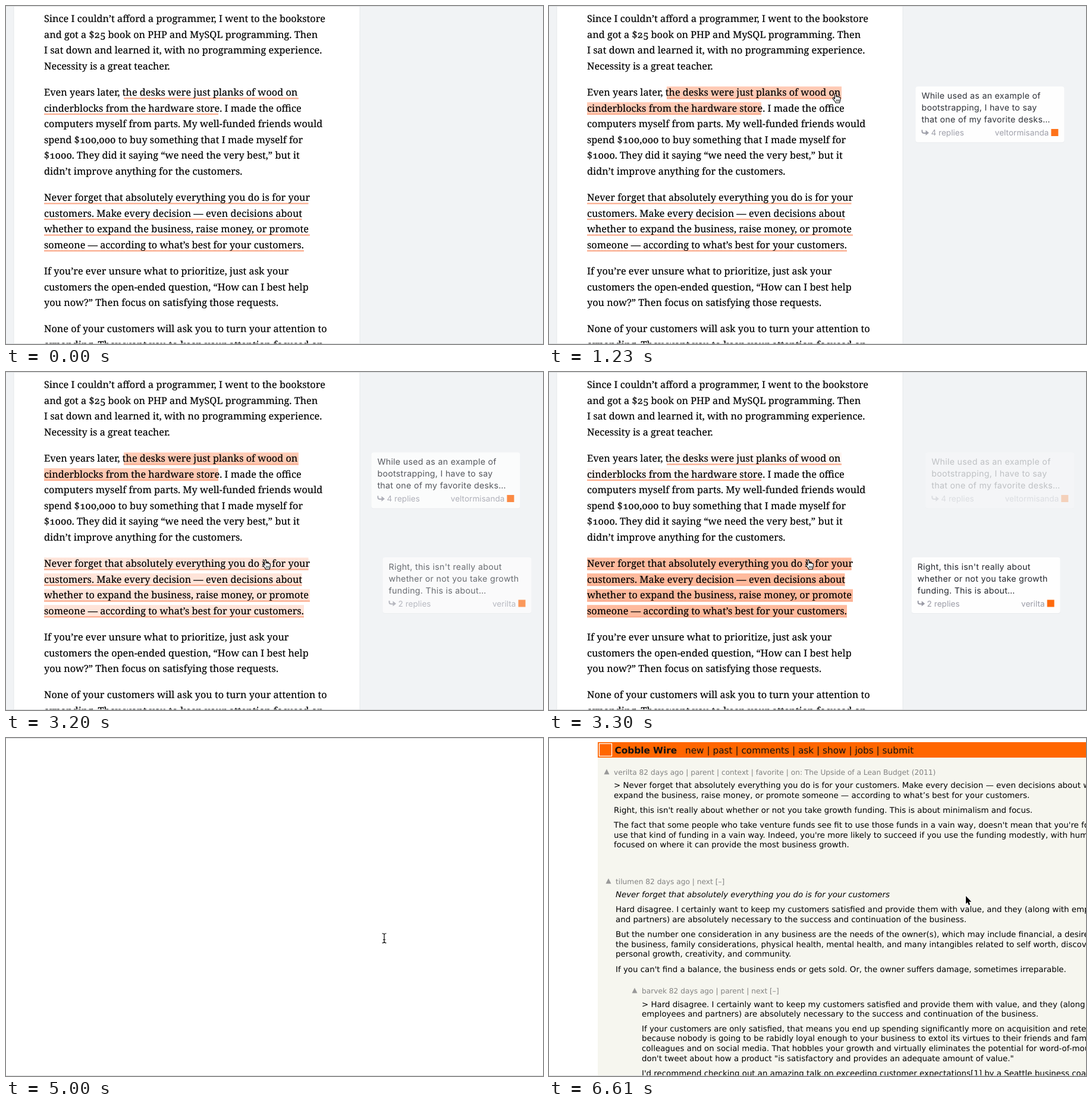
These frames come from a looping animation (903 by 569 pixels, 6650 ms). An HTML page:

```html
<!DOCTYPE html>
<html lang="en">
<head>
<meta charset="utf-8">
<title>Article notes</title>
<style>
html, body { margin: 0; width: 100%; height: 100%; overflow: hidden; background: #fff; }
svg { display: block; width: 903px; height: 569px; }
text { white-space: pre; text-rendering: geometricPrecision; }
.body { font: 16.3px "Noto Serif", serif; font-variant-numeric: oldstyle-nums; stroke: #000; stroke-width: .2px; }
.note { font: 14.2px Inter, sans-serif; letter-spacing: .3px; fill: #24272e; }
.foot { font: 13.5px Inter, sans-serif; letter-spacing: .05px; fill: #9a9ba6; }
.post { font: 13.36px "DejaVu Sans", sans-serif; }
.quote { font-style: italic; }
.meta { font: 12.2px "DejaVu Sans", sans-serif; fill: #828282; }
.nav { font: 15.3px "DejaVu Sans", sans-serif; fill: #111; }
.brand { font-weight: 700; }
</style>
</head>
<body>
<svg id="stage" viewBox="0 0 903 569"></svg>
<script>
const NS = "http://www.w3.org/2000/svg";
const stage = document.getElementById("stage");
const LOOP = 6650;

function el(parent, tag, attrs = {}, content) {
  const node = document.createElementNS(NS, tag);
  for (const k in attrs) node.setAttribute(k, attrs[k]);
  if (content !== undefined) node.textContent = content;
  parent.appendChild(node);
  return node;
}
const group = (parent, attrs) => el(parent, "g", attrs);
const rect = (parent, x, y, width, height, fill, more) =>
  el(parent, "rect", { x, y, width, height, fill, ...more });
const text = (parent, cls, x, y, str, more) =>
  el(parent, "text", { class: cls, x, y, ...more }, str);

// Article page
const LINE = 26.57;
const article = group(stage);
rect(article, 0, 0, 903, 569, "#f1f3f5");
rect(article, 12.5, 0, 583, 569, "#e6e8eb");
rect(article, 13.5, 0, 581, 569, "#fff");

function passage(spans) {
  const glow = group(article, { opacity: 0 });
  for (const [x, end, y] of spans) {
    rect(glow, x, y - 15.5, end - x, 20.5, "#ffb08f");
    rect(article, x, y + 3.4, end - x, 2.2, "#fbab8c");
  }
  return glow;
}
const glows = [
  passage([[198, 492, 151], [64, 357, 151 + LINE]]),
  passage([508.5, 497.5, 511, 501].map((end, i) => [64, end, 328 + i * LINE]))
];

const paragraphs = [
  [27, "Since I couldn’t afford a programmer, I went to the bookstore",
    "and got a $25 book on PHP and MySQL programming. Then",
    "I sat down and learned it, with no programming experience.",
    "Necessity is a great teacher."],
  [151, "Even years later, the desks were just planks of wood on",
    "cinderblocks from the hardware store. I made the office",
    "computers myself from parts. My well-funded friends would",
    "spend $100,000 to buy something that I made myself for",
    "$1000. They did it saying “we need the very best,” but it",
    "didn’t improve anything for the customers."],
  [328, "Never forget that absolutely everything you do is for your",
    "customers. Make every decision — even decisions about",
    "whether to expand the business, raise money, or promote",
    "someone — according to what’s best for your customers."],
  [452, "If you’re ever unsure what to prioritize, just ask your",
    "customers the open-ended question, “How can I best help",
    "you now?” Then focus on satisfying those requests."],
  [549, "None of your customers will ask you to turn your attention to",
    "expanding. They want you to keep your attention focused on"]
];
for (const [top, ...lines] of paragraphs)
  lines.forEach((line, i) => text(article, "body", 64, top + i * LINE, line));

function card(y, lines, replies, author) {
  const g = group(article);
  rect(g, 0, 1, 250, 94, "#e8eaed", { rx: 4 });
  rect(g, 0, 0, 250, 94, "#fff", { rx: 4 });
  lines.forEach((line, i) => text(g, "note", 10, 20.5 + i * 20, line));
  el(g, "path", { d: "M11 73v2.5q0 3 3 3h6", fill: "none", stroke: "#9a9ba6", "stroke-width": 2 });
  el(g, "path", { d: "M17 73.5v9l5.5-4.5z", fill: "#9a9ba6" });
  text(g, "foot", 26, 82.5, replies + " replies");
  text(g, "foot", 224, 82.5, author, { "text-anchor": "end" });
  rect(g, 228, 71.5, 12, 12, "#ff6a0d");
  return { g, y };
}
const cards = [
  card(135.5, ["While used as an example of", "bootstrapping, I have to say",
    "that one of my favorite desks…"], 4, "veltormisanda"),
  card(312, ["Right, this isn't really about", "whether or not you take growth",
    "funding. This is about…"], 2, "verilta")
];

// New tab: blank sheet, then the forum thread
const blank = rect(stage, 0, 0, 903, 569, "#fff");
const forum = group(stage);
rect(forum, 82, 7, 821, 562, "#f6f6ef");
rect(forum, 82, 7, 821, 26, "#ff6600");
rect(forum, 84.5, 9.5, 21, 21, "#ff6600", { stroke: "#fff", "stroke-width": 1.3 });
text(forum, "nav brand", 110.5, 25.5, "Cobble Wire");
text(forum, "nav", 229, 25.5, "new | past | comments | ask | show | jobs | submit");

function comment(x, y, meta, rows) {
  el(forum, "path", { d: `M${x - 16.5} ${y - 0.5}h9l-4.5-9z`, fill: "#999" });
  text(forum, "meta", x, y, meta);
  for (const [top, ...lines] of rows)
    lines.forEach((line, i) => text(forum, "post", x, top + i * 16.6, line));
}
comment(109, 61.7, "verilta 82 days ago | parent | context | favorite | on: The Upside of a Lean Budget (2011)", [
  [84, "> Never forget that absolutely everything you do is for your customers. Make every decision — even decisions about whether to",
    "expand the business, raise money, or promote someone — according to what’s best for your customers."],
  [126, "Right, this isn't really about whether or not you take growth funding. This is about minimalism and focus."],
  [151, "The fact that some people who take venture funds see fit to use those funds in a vain way, doesn't mean that you're forced to",
    "use that kind of funding in a vain way. Indeed, you're more likely to succeed if you use the funding modestly, with humility and",
    "focused on where it can provide the most business growth."]
]);
comment(112, 245.7, "tilumen 82 days ago | next [–]", [
  [293.3, "Hard disagree. I certainly want to keep my customers satisfied and provide them with value, and they (along with employees",
    "and partners) are absolutely necessary to the success and continuation of the business."],
  [335, "But the number one consideration in any business are the needs of the owner(s), which may include financial, a desire to grow",
    "the business, family considerations, physical health, mental health, and many intangibles related to self worth, discovery,",
    "personal growth, creativity, and community."],
  [393.6, "If you can't find a balance, the business ends or gets sold. Or, the owner suffers damage, sometimes irreparable."]
]);
text(forum, "post quote", 112, 268, "Never forget that absolutely everything you do is for your customers");
comment(156, 430, "barvek 82 days ago | parent | next [–]", [
  [452.5, "> Hard disagree. I certainly want to keep my customers satisfied and provide them with value, and they (along with",
    "employees and partners) are absolutely necessary to the success and continuation of the business."],
  [493.8, "If your customers are only satisfied, that means you end up spending significantly more on acquisition and retention,",
    "because nobody is going to be rabidly loyal enough to your business to extol its virtues to their friends and family,",
    "colleagues and on social media. That hobbles your growth and virtually eliminates the potential for word-of-mouth; people",
    "don't tweet about how a product \"is satisfactory and provides an adequate amount of value.\""],
  [568.8, "I'd recommend checking out an amazing talk on exceeding customer expectations[1] by a Seattle business coach"]
]);

rect(stage, 0, 0, 903, 1, "#d9dadc");
rect(stage, 0, 568, 903, 1, "#d9dadc");

// Pointers, each drawn around its own centre
const pointers = { hand: group(stage), arrow: group(stage), beam: group(stage) };
el(pointers.hand, "path", {
  d: "M-3-1.5V-6.6a1.3 1.3 0 0 1 2.6 0V-2a1.25 1.25 0 0 1 2.5.2a1.2 1.2 0 0 1 2.3.5a1.1 1.1 0 0 1 2 .6V2.5c0 2-1 3-1.2 5.5H-1.4C-2 5.5-4.4 4-6.1.9c-.5-1.3 1-2 2-1L-3 1.5z",
  fill: "#fff", stroke: "#000", "stroke-width": 1.1, "stroke-linejoin": "round"
});
el(pointers.hand, "path", { d: "M-.2 2.5v3.3M1.9 2.5v3.3M4 2.5v3.3", stroke: "#000", "stroke-width": 0.9 });
el(pointers.arrow, "path", {
  d: "M-4-7V6.3L-1.1 3.5L.9 8.2L3.1 7.2L1.2 2.7H5.3Z",
  fill: "#000", stroke: "#fff", "stroke-width": 1.2, "paint-order": "stroke"
});
for (const [stroke, width] of [["#fff", 2.4], ["#000", 1.2]])
  el(pointers.beam, "path", {
    d: "M-3.5-8Q0-8 0-6Q0-8 3.5-8M0-6V6M-3.5 8Q0 8 0 6Q0 8 3.5 8M-2 2.5H2",
    fill: "none", stroke, "stroke-width": width
  });

const clamp = v => Math.min(1, Math.max(0, v));
const span = (t, a, b) => clamp((t - a) / (b - a));
const inOut = p => p * p * (3 - 2 * p);
const out = k => p => 1 - (1 - p) ** k;

// start, end, from, to, easing
const moves = [
  [30, 670, [604, 536], [482, 158], inOut],
  [700, 1000, [482, 158], [483.5, 155], out(2)],
  [2030, 2670, [483.5, 155], [441, 322], inOut],
  [2700, 3000, [441, 322], [438, 324], out(2)],
  [3970, 4630, [438, 324], [636, 337], out(2.5)],
  [6430, 6610, [636, 337], [705, 273], inOut]
];
function pointerAt(t) {
  let [x, y] = moves[0][2];
  for (const [a, b, from, to, ease] of moves) {
    if (t < a) break;
    const p = ease(span(t, a, b));
    x = from[0] + (to[0] - from[0]) * p;
    y = from[1] + (to[1] - from[1]) * p;
  }
  return [x, y];
}
function pointerKind(t, x, y) {
  if (t > 4900) return t > 6560 ? "arrow" : "beam";
  if (x > 606 && t > 3900) return "hand";
  if (x > 545) return "arrow";
  if (x < 492 && y > 140 && y < 166) return "hand";
  if (x < 511 && y > 314 && y < 420) return "hand";
  return "beam";
}

function enter(t, start) {
  const p = span(t, start, start + 270);
  return { glow: out(3)(p), shift: 50 * (1 - p) ** 5, alpha: out(8)(p) };
}
function leave(t, start) {
  const p = span(t, start, start + 265);
  return { glow: (1 - p) ** 3, shift: 50 * p, alpha: (1 - p) ** 2 };
}

function draw(t) {
  const states = [t < 3000 ? enter(t, 1150) : leave(t, 3167), enter(t, 3167)];
  states.forEach((s, i) => {
    glows[i].setAttribute("opacity", s.glow);
    cards[i].g.setAttribute("opacity", s.alpha);
    cards[i].g.setAttribute("transform", `translate(${608 + s.shift} ${cards[i].y})`);
  });
  blank.setAttribute("opacity", span(t, 4850, 4990));
  forum.setAttribute("opacity", span(t, 5250, 5370));

  const [x, y] = pointerAt(t);
  const kind = t < 30 ? "" : pointerKind(t, x, y);
  for (const k in pointers) {
    pointers[k].setAttribute("visibility", k === kind ? "visible" : "hidden");
    pointers[k].setAttribute("transform", `translate(${x} ${y})`);
  }
}

const begin = performance.now();
function tick() {
  draw((performance.now() - begin) % LOOP);
  requestAnimationFrame(tick);
}
draw(0);
requestAnimationFrame(tick);
</script>
</body>
</html>
```
